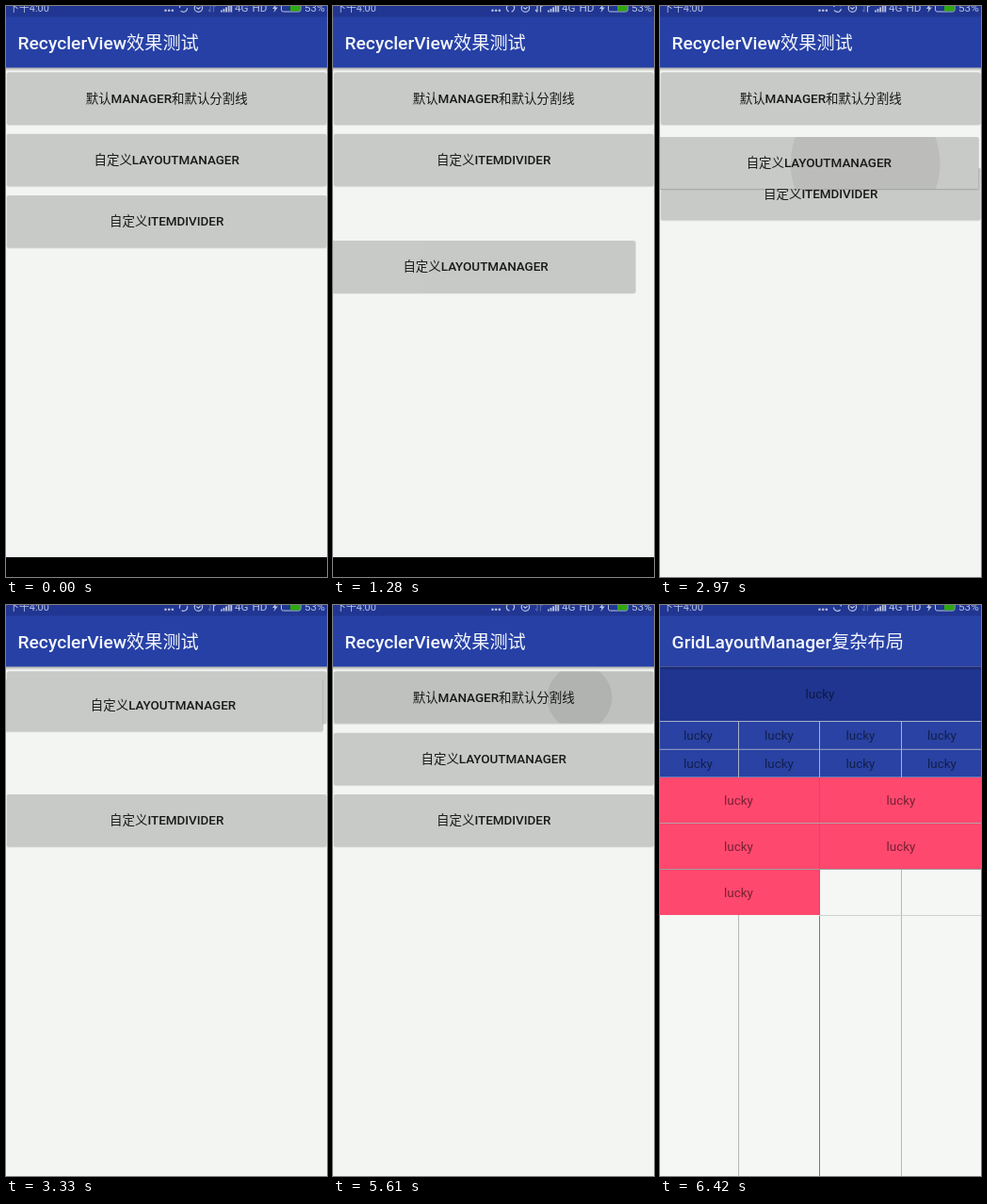
Write an HTML page that moves like this. It is 341 px wide and 606 px high and loops after 6520 ms.

```html
<!DOCTYPE html>
<html lang="zh-CN">
<head>
<meta charset="utf-8">
<title>RecyclerView</title>
<style>
html, body { margin: 0; width: 100%; height: 100%; overflow: hidden; background: #f3f5f2; }
svg { display: block; width: 100%; height: 100%; }
text { font: 400 13.44px Roboto, "Noto Sans CJK SC", "Noto Sans CJK", sans-serif; }
.mid { text-anchor: middle; }
.title { font-size: 19.2px; fill: #f4f6fc; }
.latin { font-weight: 500; }
.status text { font-size: 11.7px; fill: #b9c1df; }
.status .clock { font-size: 10.9px; }
.lucky { fill-opacity: .54; }
</style>
</head>
<body>
<svg viewBox="0 0 341 606">
  <defs>
    <linearGradient id="fade" x2="0" y2="1">
      <stop offset="0" stop-opacity=".3"/>
      <stop offset="1" stop-opacity="0"/>
    </linearGradient>
    <clipPath id="face"><rect x="1" width="339.4" height="55.2" rx="2"/></clipPath>
  </defs>
  <g id="home"></g>
  <g id="page"></g>
  <rect id="bar" y="585" width="341" height="21"/>
  <g class="status" fill="none" stroke="#b9c1df" stroke-width="1.2">
    <g id="icons" stroke="none" fill="#b9c1df">
      <text x="3" y="6.3" class="clock">下午4:00</text>
      <text x="243" y="6.3">4G</text><text x="261.5" y="6.3">HD</text>
      <path d="M286.8 -2l-3.8 5h2.4l-1 4 4.4-5.4h-2.5z"/>
      <text x="317" y="6.3">53%</text>
    </g>
    <circle id="sync" cx="188.5" cy="2.2" r="4.1" stroke-dasharray="9.4 3.5"/>
    <circle cx="204.4" cy="2.2" r="4.2"/><path d="M202.3 1.5l2 1.7 2.3-2"/>
    <path id="down" d="M217 -2V6M215 4l2 2.3"/>
    <path id="up" d="M220.5 6.5V-1M220.5 .2h2.3"/>
    <rect x="292.5" y="-3" width="20.5" height="9" rx="2" stroke-width="1"/>
    <rect x="302" y="-2" width="10.6" height="7.4" rx="1" fill="#2fa80e" stroke="none"/>
  </g>
</svg>
<script>
const LOOP = 6520, WIDTH = 345.6, LEFT = -3, TOP = 70.3, PITCH = 65.3, HEAD = 65.5;
const $ = id => document.getElementById(id);
const home = $('home'), page = $('page');

function add(parent, tag, attrs, html = '') {
  const el = document.createElementNS('http://www.w3.org/2000/svg', tag);
  for (const k in attrs) el.setAttribute(k, attrs[k]);
  el.innerHTML = html;
  return parent.appendChild(el);
}
const rect = (g, x, y, width, height, fill) => add(g, 'rect', { x, y, width, height, fill });
const mixed = s => s.replace(/[A-Za-z]+/g, '<tspan class="latin">$&</tspan>');

function screen(g, title, bar, back) {
  rect(g, LEFT, 0, WIDTH, 606, back);
  rect(g, LEFT, 0, WIDTH, HEAD, bar);
  rect(g, LEFT, 0, WIDTH, 11.5, '#203692');
  add(g, 'text', { x: 12.6, y: 46, class: 'title' }, mixed(title));
}
const headShadow = g => rect(g, LEFT, HEAD, WIDTH, 3.8, 'url(#fade)');

function button(label) {
  const g = add(home, 'g', {});
  add(g, 'rect', { x: .4, y: .1, width: 340.6, height: 56.5, rx: 2.6, 'fill-opacity': .07 });
  add(g, 'rect', { x: .9, y: .4, width: 339.6, height: 55.5, rx: 2.2, 'fill-opacity': .11 });
  const face = add(g, 'g', { 'clip-path': 'url(#face)' });
  const base = rect(face, 1, 0, 339.4, 55.2, '#c8cac7');
  const ripple = add(face, 'circle', { cy: 28 });
  add(g, 'text', { x: 170.7, y: 32.3, class: 'mid', fill: '#181a18' }, mixed(label));
  return { g, base, ripple };
}

function buildPage() {
  const edge = i => Math.floor(LEFT + i * WIDTH / 4);
  const cell = (i, span, y, h, fill) => {
    const x = edge(i) + 1, w = edge(i + span) - x;
    rect(page, x, y, w, h, fill);
    add(page, 'text', { x: x + w / 2, y: y + h / 2 + 4.5, class: 'mid lucky' }, 'lucky');
  };
  screen(page, 'GridLayoutManager复杂布局', '#2942a6', '#f5f7f4');
  rect(page, LEFT, 123, WIDTH, 60, '#a9b1c9');
  for (let i = 1; i < 4; i++) rect(page, edge(i), 183, 1, 423, i == 2 ? '#777977' : '#b7b9b6');
  rect(page, LEFT, 231, WIDTH, 1, '#b5a0a4');
  rect(page, LEFT, 280, WIDTH, 1, '#9c9e9b');
  rect(page, edge(2), 329, WIDTH / 2, 1, '#cfd1ce');
  cell(0, 4, HEAD, 123 - HEAD, '#1f3590');
  for (let i = 0; i < 8; i++) cell(i % 4, 1, 124 + (i >> 2) * 29.7, 28.8, '#2942a3');
  for (let i = 0; i < 5; i++) cell(i % 2 * 2, 2, 183 + (i >> 1) * 49, 48, '#ff486e');
  headShadow(page);
}

for (let i = 0; i < 3; i++) add($('icons'), 'circle', { cx: 169.5 + i * 3.7, cy: 4.8, r: 1.3 });
for (let i = 0; i < 5; i++) rect($('icons'), 228 + i * 2.6, 4.5 - i * 1.6, 1.8, 2 + i * 1.6, '#b9c1df');
screen(home, 'RecyclerView效果测试', '#2640a5', '#f3f5f2');
headShadow(home);
const manager = button('默认MANAGER和默认分割线');
const divider = button('自定义ITEMDIVIDER');
const layout = button('自定义LAYOUTMANAGER');
const shade = rect(home, LEFT, 0, WIDTH, 606, '#000');
buildPage();

// Bursts of evenly spaced screen refreshes: first, last, count
const BURSTS = [[140, 1130, 8], [1280, 1850, 5], [2130, 3090, 8], [3210, 4140, 8],
  [4260, 5180, 5], [5460, 6420, 7]];

function held(ms) {
  const burst = BURSTS.findLast(b => b[0] <= ms);
  if (!burst) return 0;
  const [first, last, count] = burst, gap = (last - first) / (count - 1);
  return first + gap * Math.min(count - 1, Math.floor((ms - first) / gap + .12));
}

const ramp = (t, a, b) => Math.max(0, Math.min(1, (t - a) / (b - a)));
const ease = (t, a, b) => { const u = ramp(t, a, b); return u * u * (3 - 2 * u); };
const move = (el, x, y = 0) => el.setAttribute('transform', `translate(${x} ${y})`);
const slot = n => TOP + n * PITCH;

function press(b, x, t, from, release) {
  b.ripple.setAttribute('cx', x);
  b.ripple.setAttribute('r', t < from ? 0 : 14 + (t - from) * .093);
  b.ripple.setAttribute('fill-opacity', .075 * (1 - ramp(t, release, release + 300)));
}

function draw(ms) {
  const t = held(ms);

  // Drag down past the last slot and drop, then lift to the top and fall back
  const down = ease(t, 440, 890), drop = ease(t, 1060, 1640);
  const lift = ease(t, 2600, 3300), back = ease(t, 3450, 4120);
  const low = 272, high = 78.6;
  move(layout.g, -28.2 * (down - drop) - 3.7 * (lift - back),
    slot(1) + (low - slot(1)) * down + (slot(2) - low) * drop + (high - slot(2)) * lift + (slot(1) - high) * back);
  move(divider.g, 0, slot(2 - ease(t, 755, 985) + ease(t, 2830, 3060)));
  move(manager.g, 0, TOP);

  if (t < 2130) press(layout, 232.5, t, 140, 1000);
  else press(layout, 220, t, 2250, 2900);
  press(manager, 262, t, 5400, LOOP);
  manager.base.setAttribute('fill', t > 5460 ? '#bfc1be' : '#c8cac7');

  const slide = ease(t, 5810, 6139);
  move(home, -75 * slide);
  move(page, WIDTH * (1 - slide) + (slide ? 0 : 4));
  shade.setAttribute('fill-opacity', .42 * slide);

  $('bar').style.display = t < 2130 ? '' : 'none';
  $('sync').setAttribute('transform', `rotate(${t * .37} 188.5 2.2)`);
  const idle = t < 440 || t >= 5460, half = t >= 1850 && t < 4140;
  $('down').style.opacity = idle || half ? .35 : 1;
  $('up').style.opacity = idle ? .35 : 1;
}

const start = performance.now();
(function loop() {
  draw((performance.now() - start) % LOOP);
  requestAnimationFrame(loop);
})();
</script>
</body>
</html>
```
